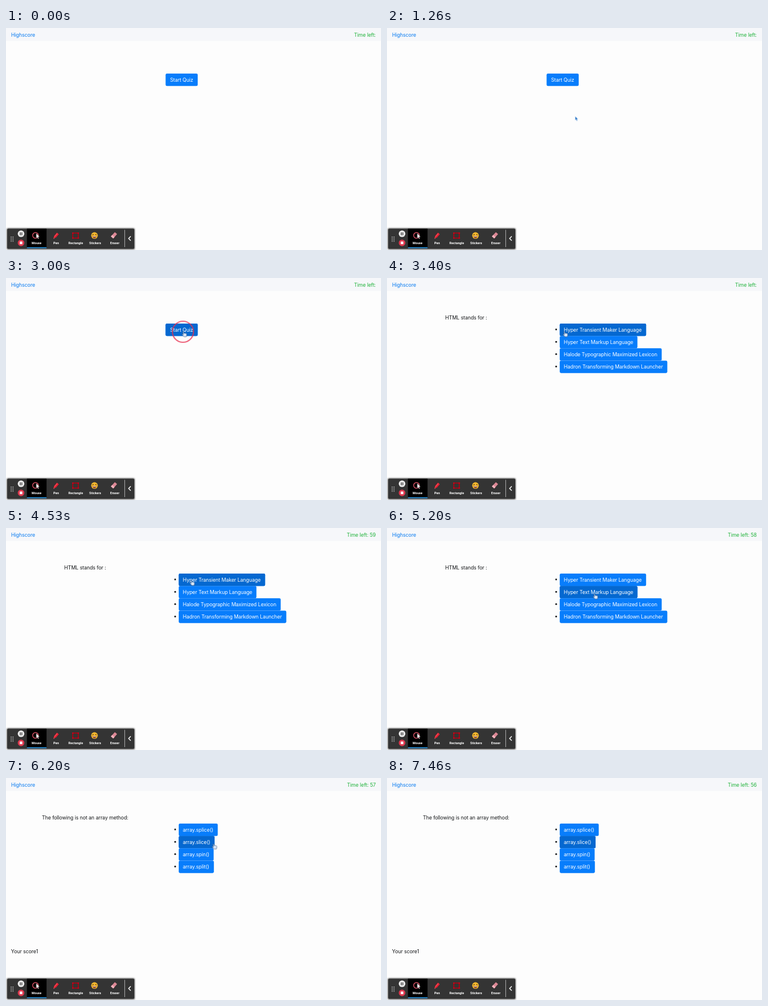
Recreate the animation shown at these times as an HTML page. Size 640 by 380 pixels, loop 8 s.

```html
<!DOCTYPE html>
<html lang="en">
<head>
<meta charset="utf-8">
<title>Quiz</title>
<style>
html, body { margin: 0; width: 100%; height: 100%; overflow: hidden; background: #fdfdfd; }
svg { display: block; width: 640px; height: 380px; }
text { font: 8.65px Inter, Roboto, sans-serif; letter-spacing: -.1px; fill: #16181a; }
.link { fill: #087bf0; }
.time text { fill: #22b33d; text-anchor: end; }
.mid { text-anchor: middle; }
.btn rect { fill: #087dfb; }
.btn text { fill: #fff; }
.btn .hot { fill: #0568d0; }
.tools text { font: 700 5.5px Roboto, sans-serif; letter-spacing: 0; fill: #fff; text-anchor: middle; }

.step { opacity: 0; animation: 8s step-end infinite; }
.start { animation-name: start; }
.q1 { animation-name: q1; }
.q2 { animation-name: q2; }
.t0 { animation-name: t0; }
.t59 { animation-name: t59; }
.t58 { animation-name: t58; }
.t57 { animation-name: t57; }
.t56 { animation-name: t56; }
.arrow { animation-name: arrow; }
.hand { animation-name: hand; }
.ring1 { animation-name: ring1; }
.ring2 { animation-name: ring2; }
@keyframes start { 0% { opacity: 1 } 39.125%, 100% { opacity: 0 } }
@keyframes q1 { 0% { opacity: 0 } 39.125% { opacity: 1 } 72.5%, 100% { opacity: 0 } }
@keyframes q2 { 0% { opacity: 0 } 72.5%, 100% { opacity: 1 } }
@keyframes t0 { 0% { opacity: 1 } 51.625%, 100% { opacity: 0 } }
@keyframes t59 { 0% { opacity: 0 } 51.625% { opacity: 1 } 64.125%, 100% { opacity: 0 } }
@keyframes t58 { 0% { opacity: 0 } 64.125% { opacity: 1 } 76.625%, 100% { opacity: 0 } }
@keyframes t57 { 0% { opacity: 0 } 76.625% { opacity: 1 } 89.125%, 100% { opacity: 0 } }
@keyframes t56 { 0% { opacity: 0 } 89.125%, 100% { opacity: 1 } }
@keyframes arrow { 0% { opacity: 0 } 15.75% { opacity: 1 } 19.1%, 100% { opacity: 0 } }
@keyframes hand { 0% { opacity: 0 } 19.1% { opacity: 1 } 89.125%, 100% { opacity: 0 } }
@keyframes ring1 { 0% { opacity: 0 } 37.5% { opacity: 1 } 39.125%, 100% { opacity: 0 } }
@keyframes ring2 { 0% { opacity: 0 } 67.5% { opacity: 1 } 72.5%, 100% { opacity: 0 } }

/* hover fades, 150 ms each */
.hov { opacity: 0; animation: 8s linear infinite; }
.h0 { animation-name: h0; }
.h1 { animation-name: h1; }
.h2 { animation-name: h2; }
@keyframes h0 { 0%, 19.1% { opacity: 0 } 21%, 100% { opacity: 1 } }
@keyframes h1 { 0%, 60.5% { opacity: 1 } 62.4%, 100% { opacity: 0 } }
@keyframes h2 { 0%, 60.5% { opacity: 0 } 62.4%, 100% { opacity: 1 } }

.cursor { animation: move 8s infinite; }
@keyframes move {
  0%, 15.75% { transform: translate(321.3px, 151.5px); animation-timing-function: ease-out }
  20.5%, 47.5% { transform: translate(301.3px, 91.2px); animation-timing-function: ease-in-out }
  50%, 56.6% { transform: translate(314.6px, 89px); animation-timing-function: ease-in-out }
  64.125%, 100% { transform: translate(352.6px, 112.2px) }
}
</style>
</head>
<body>
<svg viewBox="0 0 640 380">
  <defs>
    <filter id="glow" x="-5%" y="-20%" width="110%" height="140%"><feGaussianBlur stdDeviation="1.2"/></filter>
  </defs>
  <rect width="640" height="380" fill="#fdfdfd"/>
  <rect width="640" height="22.3" fill="#f6f7fa"/>
  <text class="link" x="8.8" y="14.6">Highscore</text>
  <g class="time">
    <text class="step t0" x="631" y="14.6">Time left:</text>
    <text class="step t59" x="631" y="14.6">Time left: 59</text>
    <text class="step t58" x="631" y="14.6">Time left: 58</text>
    <text class="step t57" x="631" y="14.6">Time left: 57</text>
    <text class="step t56" x="631" y="14.6">Time left: 56</text>
  </g>

  <g class="step start btn">
    <rect x="272.4" y="78" width="54.8" height="21.2" rx="2.3"/>
    <rect class="hot hov h0" x="272.4" y="78" width="54.8" height="21.2" rx="2.3"/>
    <text class="mid" x="299.8" y="91.8">Start Quiz</text>
  </g>

  <g class="step q1">
    <text class="mid" x="135" y="71.3">HTML stands for :</text>
    <g id="list1" class="btn"></g>
  </g>

  <g class="step q2">
    <text class="mid" x="135" y="71.3">The following is not an array method:</text>
    <g id="list2" class="btn"></g>
    <text x="8.6" y="299.6">Your score1</text>
  </g>

  <g fill="none" stroke="#e8304f" stroke-opacity=".72" stroke-width="2.2">
    <circle class="step ring1" cx="302" cy="92" r="18"/>
    <circle class="step ring2" cx="353.5" cy="113" r="18"/>
  </g>

  <g class="tools">
    <rect x="1" y="342.5" width="219" height="37" rx="3" fill="#777" filter="url(#glow)"/>
    <rect x="2" y="343.5" width="217" height="34.5" rx="2" fill="#343434"/>
    <rect x="35.7" y="343.5" width="33.5" height="33.5" fill="#000"/>
    <rect x="35.7" y="375.4" width="33.5" height="1.6" fill="#2e9be6"/>
    <path d="M8.8 357v9M12 357v9" stroke="#ddd" stroke-width="1.3" stroke-dasharray="1.2 1.3"/>
    <circle cx="25.7" cy="352.2" r="5.6" fill="#eee"/>
    <path d="M24.4 349.7v5M27 349.7v5" stroke="#333" stroke-width="1.3"/>
    <circle cx="25.7" cy="367.8" r="5.6" fill="#df3a50"/>
    <rect x="23.5" y="365.6" width="4.4" height="4.4" rx=".5" fill="#fff"/>

    <circle cx="50.4" cy="355" r="4.9" fill="none" stroke="#e8566b" stroke-width="1.3"/>
    <path d="M51.6 351.3v8.4l1.9-1.6 1.3 2.9 1.3-.6-1.3-2.8 2.5-.2z" fill="#fff" stroke="#222" stroke-width=".4"/>

    <path d="M81 360.3l1.1-4.2 4.8-5.8 3.3 2.6-5 5.9z" fill="#e01f30"/>
    <path d="M82.5 357.6l5-6M81 360.3l1.8-.8" stroke="#ff7d83" stroke-width=".8"/>

    <rect x="114" y="351" width="9.4" height="8.6" fill="none" stroke="#b50012" stroke-width="1.6"/>
    <path d="M113 350h2v2h-2zM122.400 350h2v2h-2zM113 358.600h2v2h-2zM122.400 358.600h2v2h-2z" fill="#d60016"/>

    <circle cx="151" cy="355.200" r="5.600" fill="#f5b92e"/>
    <path d="M147.300 354.200l2.400-1M152.300 353.200l2.400 1" stroke="#5a3512" stroke-width="1.200"/>
    <path d="M147.600 356.200h6.800q-.6 3.400-3.400 3.400t-3.400-3.400z" fill="#7a2a18"/>
    <path d="M148.200 356.500h5.600v1h-5.600z" fill="#fff"/>

    <path d="M179 356.800l6.800-7.300 3.800 3.300-6.600 7.500z" fill="#dc8795"/>
    <path d="M179 356.800l4 3.500 2.300-2.600-4-3.500z" fill="#f0b3bc"/>

    <text x="52.200" y="369.600">Mouse</text>
    <text x="85.500" y="369.600">Pen</text>
    <text x="119" y="369.600">Rectangle</text>
    <text x="152.200" y="369.600">Stickers</text>
    <text x="185.700" y="369.600">Eraser</text>
    <path d="M202.600 345.500v29.500" stroke="#bbb" stroke-width=".9"/>
    <path d="M212.900 356.500l-3.600 3.700 3.600 3.700" fill="none" stroke="#fff" stroke-width="1.400"/>
  </g>

  <g class="cursor">
    <path class="step arrow" d="M0 0v6.600l1.500-1.300 1.100 2.500 1.300-.6-1.100-2.400h2z" fill="#1f70c4" stroke="#dce8f6" stroke-width=".6"/>
    <path class="step hand" d="M.6.900q.9-.7 1.400.3l.9 2.300 1.700-.3 1.500.4.900 1 .1 2.500-.7 2.200H2.500L.6 7.200-.8 5.300q.1-.9 1.200-.5l1 .8z" fill="#d9e7f8" stroke="#20406c" stroke-width=".6"/>
  </g>
</svg>
<script>
const rect = (y, w, cls) =>
  `<rect class="${cls}" x="294.800" y="${y}" width="${w}" height="21.2" rx="2.3"/>`;

function fill(id, rows, hover) {
  document.getElementById(id).innerHTML = rows.map(([label, w], i) => {
    const y = 78 + i * 21.15;
    return `<circle cx="288.700" cy="${y + 10}" r="1.500" fill="#16181a"/>` +
      rect(y, w, "") + (hover[i] ? rect(y, w, hover[i]) : "") +
      `<text x="301.800" y="${y + 13.8}">${label}</text>`;
  }).join("");
}

fill("list1", [
  ["Hyper Transient Maker Language", 147.4],
  ["Hyper Text Markup Language", 132.6],
  ["Halode Typographic Maximized Lexicon", 174],
  ["Hadron Transforming Markdown Launcher", 183.6]
], ["hot hov h1", "hot hov h2"]);

fill("list2", [
  ["array.splice()", 66.6],
  ["array.slice()", 61.2],
  ["array.spin()", 59.6],
  ["array.split()", 60]
], ["", "hot"]);
</script>
</body>
</html>
```
